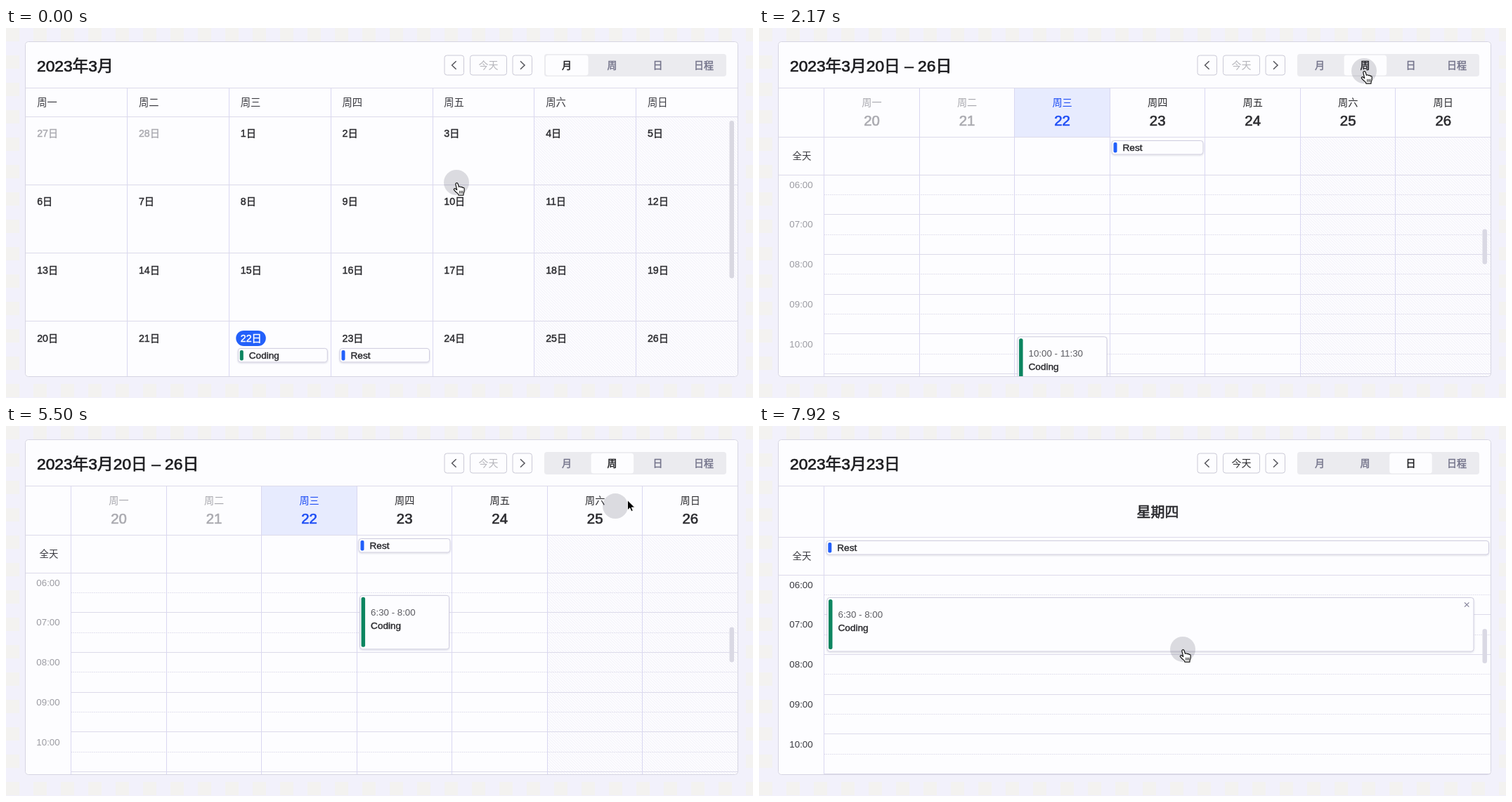
An HTML page for the animation above (8000 ms loop, 1063 by 527 pixels).

```html
<!DOCTYPE html>
<html lang="zh-CN">
<head>
<meta charset="utf-8">
<title>日历</title>
<style>
html, body { margin: 0; width: 100%; height: 100%; overflow: hidden; background: #f2f1fa; }
svg { display: block; width: 100vw; height: 100vh; }
text { font-family: "Liberation Sans", "Noto Sans CJK SC", "Noto Sans CJK", sans-serif; white-space: pre; }
</style>
</head>
<body>
<svg id="stage" viewBox="0 0 1063 527" xmlns="http://www.w3.org/2000/svg"></svg>
<script>
const LOOP = 8000, FPS = 12;
const INK = '#2b2b2f', DIM = '#aaaab0', BLUE = '#2360fa', GREEN = '#0c8560';
const PAPER = '#fdfdff', VLINE = '#d9d7f1', HLINE = '#dcdaea';
const LEFT = 28, RIGHT = 1041.5, AXIS = 92.8;
const DAY_W = (RIGHT - LEFT) / 7, WEEK_W = (RIGHT - AXIS) / 7;
const ROW_H = 97.3, HOUR_H = 56.7;
const DAYS = [...'一二三四五六日'].map(c => '周' + c);

// ---- markup helpers ----
const range = (n, f) => Array.from({ length: n }, (_, i) => f(i)).join('');
const snap = v => Math.floor(v) + 0.5;

function rect(x, y, w, h, fill, r = 0, extra = '') {
  return `<rect x="${x}" y="${y}" width="${w}" height="${h}" rx="${r}" fill="${fill}" ${extra}/>`;
}
function hline(y, x1 = LEFT, extra = '') {
  return `<path d="M${x1} ${snap(y)}H${RIGHT}" stroke="${HLINE}" ${extra}/>`;
}
function vline(x, y1 = 86, y2 = 497) {
  return `<path d="M${snap(x)} ${y1}V${y2}" stroke="${VLINE}"/>`;
}
// y is the middle of the capitals; medium weight is a thin outline
function text(x, y, s, size, fill = INK, medium = false, anchor = 'start') {
  const bold = medium ? `stroke="${fill}" stroke-width="${size * 0.032}"` : '';
  return `<text x="${x}" y="${y + size * 0.36}" font-size="${size}" fill="${fill}" ${bold} text-anchor="${anchor}">${s}</text>`;
}
const mid = (x, y, s, size, fill, medium) => text(x, y, s, size, fill, medium, 'middle');

function box(x, y, w, h) {
  return rect(x + 0.5, y + 0.5, w - 1, h - 1, PAPER, 3.5, 'stroke="#cfcddf" filter="url(#soft)"');
}
function chip(x, y, w, label, color) {
  return box(x, y, w, 20.5) + rect(x + 3, y + 3, 5, 14.5, color, 2) +
    text(x + 16, y + 10.3, label, 13.6, INK, true);
}
function card(x, y, w, time, grey) {
  return box(x, y, w, 77.5) + rect(x + 2.5, y + 3, 5.5, 71, grey ? '#c6c6cd' : GREEN, 2.5) +
    text(x + 16, y + 24, time, 13.3, grey ? '#b4b4ba' : '#5c5c62') +
    text(x + 16, y + 43.3, 'Coding', 13.6, grey ? DIM : INK, true);
}
function cross(x, y) {
  return `<path d="M${x - 3} ${y - 3}l6.4 6.4m0-6.4l-6.4 6.4" stroke="#85839b" stroke-width="1.2"/>`;
}

// ---- views ----
function monthGrid() {
  const cell = i => {
    const row = Math.floor(i / 7), col = i % 7;
    const day = i < 2 ? 27 + i : (i - 2) % 31 + 1;
    const x = LEFT + col * DAY_W + 16.2, y = 126 + row * ROW_H;
    const today = i === 23, out = i < 2 || i > 32;
    return (today ? rect(x - 6.5, y + 13, 42.5, 22, BLUE, 11) : '') +
      text(x, y + 24, day + '日', 14.2, today ? '#fff' : out ? DIM : INK, true);
  };
  const top = 126 + 3 * ROW_H + 38;
  return range(6, r => hline(126 + r * ROW_H)) + range(42, cell) +
    chip(329.8, top, 128, 'Coding', GREEN) + chip(474.5, top, 128.5, 'Rest', BLUE);
}
function monthView() {
  return rect(LEFT + 5 * DAY_W, 126, 2 * DAY_W, 371, 'url(#hatch)') +
    range(6, i => vline(LEFT + (i + 1) * DAY_W)) +
    DAYS.map((d, i) => text(LEFT + i * DAY_W + 16.2, 106, d, 14.3, '#3a3a40')).join('') +
    hline(126) +
    `<g clip-path="url(#grid)"><g id="rows">${monthGrid()}</g></g>` +
    `<rect id="thumb" x="1029.5" width="6.5" height="224.5" rx="3.2" fill="#d9d8e1"/>`;
}
function hours(top, color) {
  return range(5, i => {
    const y = top + i * HOUR_H;
    return mid(60, y + 14, String(6 + i).padStart(2, '0') + ':00', 13.3, color) +
      hline(y + HOUR_H, AXIS) +
      hline(y + HOUR_H / 2, AXIS, 'stroke-dasharray="1.5 1.2"');
  });
}
function axis(top, color) {
  return vline(AXIS) + hline(top - 53.5) + hline(top) +
    mid(61, top - 27, '全天', 13.4, '#3a3a40') + hours(top, color);
}
function weekView() {
  const head = (d, i) => {
    const x = AXIS + (i + 0.5) * WEEK_W;
    const c = i < 2 ? DIM : i === 2 ? '#1c4cf5' : INK;
    return mid(x, 105.5, d, 14.2, c) + mid(x, 131.5, 20 + i, 20.4, c, true);
  };
  return rect(AXIS + 2 * WEEK_W, 86, WEEK_W, 69.5, '#e7ebfe') +
    rect(AXIS + 5 * WEEK_W, 156, 2 * WEEK_W, 341, 'url(#hatch)') +
    axis(209, '#9c9ca3') + range(6, i => vline(AXIS + (i + 1) * WEEK_W)) +
    DAYS.map(head).join('') + chip(501.5, 160, 131, 'Rest', BLUE) +
    rect(1029.5, 286.5, 6.5, 50, '#dad9e4', 3.2) + '<g id="drag"></g>';
}
function dayView() {
  return axis(212, '#3a3a40') + mid(567.5, 123, '星期四', 20, INK, true) +
    chip(95.3, 163, 943.7, 'Rest', BLUE) + card(96.5, 244, 921, '6:30 - 8:00') +
    rect(1029.5, 289, 6.5, 49, '#dad9e4', 3.2) +
    `<g id="dayCross">${cross(1007, 254.3)}</g>`;
}
function toolbar(view) {
  const title = ['2023年3月', '2023年3月20日 – 26日', '2023年3月23日'][view];
  const frame = (x, w) => rect(x + 0.5, 39, w, 28, PAPER, 3.5, 'stroke="#cac9d6"');
  const arrow = (x, s) => `<path d="M${x + 3 * s} 47.3l${-6 * s} 5.7 ${6 * s} 5.7" fill="none" stroke="#55555c" stroke-width="1.5"/>`;
  return text(44, 53.5, title, 22.75, '#1d1d20', true) +
    frame(623.5, 27.5) + frame(660, 52) + frame(720.5, 27.5) +
    arrow(637.6, 1) + arrow(735, -1) +
    mid(686.5, 53, '今天', 14, view === 2 ? INK : '#b5b5bb') +
    rect(766, 37, 259, 32, '#ebebef', 4) +
    rect(768 + view * 64.6, 38.8, 60.5, 28.6, PAPER, 3.5) +
    ['月', '周', '日', '日程'].map((s, i) =>
      mid([798, 862.5, 927.5, 993][i], 53, s, 14, i === view ? '#1d1d20' : '#74748b', true)).join('');
}

// ---- scene ----
const HAND = 'M-1.6 2C-2.2-.2 .8-1 1.6 1.2L3 5.6C3.8 4.6 5.4 4.8 5.8 6C6.8 5.2 8.2 5.6 8.4 6.8C9.4 6.2 10.6 6.8 10.7 8.2C10.9 11 10.6 13.5 9.6 15.2L9.4 17.4H2.4L2 15.6C0 14-2.6 11.6-4 9.8C-4.8 8.4-3 7.2-1.6 8.4L.2 9.8Z';
const ARROW = 'M0 0V14L3.3 11L5.4 15.8L7.8 14.8L5.7 10.2H10.2Z';

document.getElementById('stage').innerHTML = `
<defs>
  <pattern id="hatch" width="4" height="4" patternUnits="userSpaceOnUse">
    <path d="M-1 -1L5 5M-1 3L1 5M3 -1L5 1" stroke="#f4f3fa" stroke-width="1.2"/>
  </pattern>
  <pattern id="plaid" width="39" height="39" patternUnits="userSpaceOnUse">
    <path d="M0 0H19V19H0Z" fill="#f4f4ea" opacity=".6"/>
  </pattern>
  <filter id="soft" x="-5%" y="-20%" width="110%" height="150%">
    <feDropShadow dx="0" dy="1" stdDeviation="1" flood-color="#30305a" flood-opacity=".16"/>
  </filter>
  <clipPath id="grid"><rect x="28" y="126" width="1014" height="371"/></clipPath>
  <clipPath id="panel"><rect x="27" y="19" width="1015" height="478" rx="4"/></clipPath>
</defs>
${rect(0, 0, 1063, 527, '#f2f1fb')}${rect(0, 0, 1063, 527, 'url(#plaid)')}
<g clip-path="url(#panel)">
  ${rect(27, 19, 1015, 478, PAPER)}
  ${[monthView, weekView, dayView].map((f, i) => `<g id="view${i}">${toolbar(i)}${f()}</g>`).join('')}
  ${hline(85)}
</g>
${rect(27.5, 19.5, 1014, 477, 'none', 4, 'stroke="#d6d5e2"')}
<circle id="halo" r="18" fill="#1c1c30" fill-opacity=".15"/>
<circle id="press" r="12" fill="#1c2440" fill-opacity=".24"/>
<g id="pointer">
  <g id="hand"><path d="${HAND}" fill="#fff" stroke="#111" stroke-width="1.2" stroke-linejoin="round"/>
  <path d="M4.2 11v4M6.3 11v4M8.3 11v4" stroke="#111" stroke-width=".9"/></g>
  <path id="arrow" d="${ARROW}" fill="#000" stroke="#fff" stroke-width=".9"/>
</g>`;
const $ = id => document.getElementById(id);
const show = (id, on) => $(id).setAttribute('display', on ? 'inline' : 'none');
const move = (id, x, y) => $(id).setAttribute('transform', `translate(${x} ${y})`);

// ---- motion ----
const smooth = u => u * u * (3 - 2 * u);
const out = p => u => 1 - (1 - u) ** p;
// time, x, y, easing into this point
const PATH = [
  [0, 641, 220], [1350, 641, 220], [1750, 861, 61, smooth],
  [2170, 861, 61], [2667, 422, 431, smooth], [3080, 422, 431],
  [3917, 562, 278, smooth], [4167, 571, 273, out(2)], [4950, 571, 273],
  [5500, 884, 105, u => u ** 1.5], [5917, 920, 61, out(2.5)],
  [6620, 920, 61], [7917, 603, 318, out(2.2)], [LOOP, 603, 318]
];
function at(t) {
  t = Math.max(t, 0);
  const i = Math.max(1, PATH.findIndex(k => k[0] >= t));
  const a = PATH[i - 1], b = PATH[i];
  const u = (b[3] || (v => v))((t - a[0]) / (b[0] - a[0]));
  return [a[1] + (b[1] - a[1]) * u, a[2] + (b[2] - a[2]) * u];
}
const inside = ([x, y], l, t, r, b) => x > l && x < r && y > t && y < b;

let dragKey = '';
function drag(t, tip) {
  const moved = t >= 4160, grey = t >= 2910 && t < 4410;
  const start = moved ? 6.5 : t >= 3490 ? 9 : 10;
  const label = moved ? '6:30 - 8:00' : start === 9 ? '9:00 - 10:30' : '10:00 - 11:30';
  const hover = t >= 4410 && inside(tip, 503, 241, 631, 318);
  const key = [start, grey, hover].join();
  if (key !== dragKey) {
    dragKey = key;
    const x = AXIS + (moved ? 3 : 2) * WEEK_W + 3.7, y = 209 + (start - 6) * HOUR_H + 3.5;
    $('drag').innerHTML = card(x, y, 128, label, grey) + (hover ? cross(620.3, 251.3) : '');
  }
  $('drag').setAttribute('opacity', t >= 4410 && t < 4740 ? 0.77 : 1);
}

function draw(ms) {
  const t = Math.floor(ms * FPS / 1000 + 0.06) * 1000 / FPS;
  const view = t < 2080 ? 0 : t < 6410 ? 1 : 2;
  for (let i = 0; i < 3; i++) show('view' + i, i === view);

  const scroll = 95.2 * smooth(Math.min(1, Math.max(0, (t - 590) / 575)));
  move('rows', 0, -scroll);
  $('thumb').setAttribute('y', 132 + scroll * 0.636);

  const tip = at(t), halo = at(t - 20);
  drag(t, tip);
  show('dayCross', inside(tip, 97, 244, 1017, 321));

  const dip = t >= 2580 && t < 3160 ? 6 : 0;
  move('halo', ...halo);
  move('press', ...halo);
  show('press', (t >= 1990 && t < 2160) || (t >= 6330 && t < 6660));
  move('pointer', tip[0] + 0.5, tip[1] + 0.8 + dip);
  const hand = tip[1] > (view ? 155 : 126) || inside(tip, 766, 37, 1025, 69);
  show('hand', hand);
  show('arrow', !hand);
}

const begin = performance.now();
function tick() {
  draw((performance.now() - begin) % LOOP);
  requestAnimationFrame(tick);
}
tick();
</script>
</body>
</html>
```
